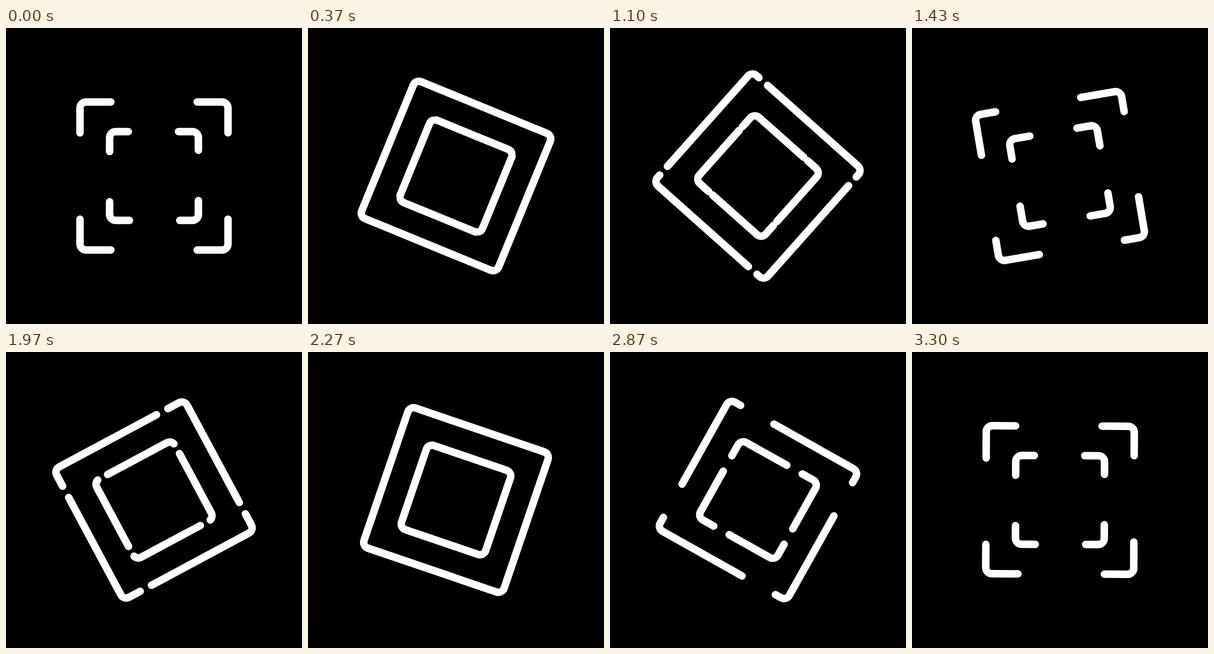
An HTML page that plays this animation: 512 px wide and 512 px high, repeating every 3.33 s.

```html
<!DOCTYPE html>
<html lang="en">
<head>
<meta charset="utf-8">
<title>Rotating squares</title>
<style>
  html, body { margin: 0; width: 100%; height: 100%; overflow: hidden; background: #000; }
  svg { display: block; width: 100vw; height: 100vh; }
  path { fill: none; stroke: #fff; stroke-width: 13; stroke-linecap: round; }
</style>
</head>
<body>
<svg viewBox="0 0 512 512"><g id="spin"></g></svg>
<script>
const LOOP = 3330, STEPS = 100, HALF = STEPS / 2, RADIUS = 10.5;
const ARC = Math.PI * RADIUS / 2;
const spin = document.getElementById('spin');

const clamp = x => Math.min(1, Math.max(0, x));
const smooth = x => x * x * (3 - 2 * x);
const ramp = (x, from, to) => smooth(clamp((x - from) / (to - from)));

// cubic-bezier(x1, 0, 2/3, 1)
function ease(x, x1) {
  let lo = 0, hi = 1;
  for (let i = 0; i < 30; i++) {
    const t = (lo + hi) / 2, u = 1 - t;
    if (3 * x1 * t * u * u + 2 * t * t * u + t * t * t < x) lo = t; else hi = t;
  }
  return smooth(lo);
}

// Four equal dashes, one per corner; each grows at its head, then its tail catches up.
function makeSquare({ half, start, rest, dir, close, open, drift }) {
  const side = 2 * (half - RADIUS);
  const quarter = side + ARC;
  const gap = quarter - rest;
  const r = RADIUS;
  const turn = (x, y) => `a${r} ${r} 0 0 1 ${x} ${y}`;
  const path = document.createElementNS('http://www.w3.org/2000/svg', 'path');
  path.setAttribute('d', `M${r - half} ${-half}h${side}${turn(r, r)}v${side}${turn(-r, r)}` +
    `h${-side}${turn(-r, -r)}v${-side}${turn(r, -r)}z`);
  path.setAttribute('pathLength', 4 * quarter);
  spin.append(path);

  return step => {
    const grow = gap * ramp(step, 0, close);
    const shrink = gap * ramp(step, ...open);
    const shift = rest * drift(step / HALF);
    const length = rest + grow - shrink;
    const from = start + dir * (shift + (dir > 0 ? shrink : grow));
    const closed = quarter - length < 0.5;
    path.style.strokeDasharray = closed ? 'none' : `${length} ${quarter - length}`;
    path.style.strokeDashoffset = ARC / 2 - from;
  };
}

const squares = [
  makeSquare({
    half: 128, start: -51, rest: 102, dir: 1, close: 11.9, open: [30, 43],
    drift: x => x + 0.03 * Math.sin(2 * Math.PI * x)
  }),
  makeSquare({
    half: 76.8, start: -32, rest: 62, dir: -1, close: 13, open: [30, 45],
    drift: x => 1 - (1 - x) ** 2.6
  })
];

function draw(step) {
  const part = step % HALF;
  const x = part / HALF;
  const angle = step < HALF ? 180 * ease(x, 1 / 3) : 180 * (1 - ease(x, 1 / 6));
  spin.setAttribute('transform', `translate(256 256) rotate(${angle})`);
  squares.forEach(update => update(part));
}

let begin;
function tick(now) {
  begin ??= now;
  const t = (now - begin) % LOOP;
  draw(Math.floor(t / LOOP * STEPS + 0.1) % STEPS);
  requestAnimationFrame(tick);
}
draw(0);
requestAnimationFrame(tick);
</script>
</body>
</html>
```
